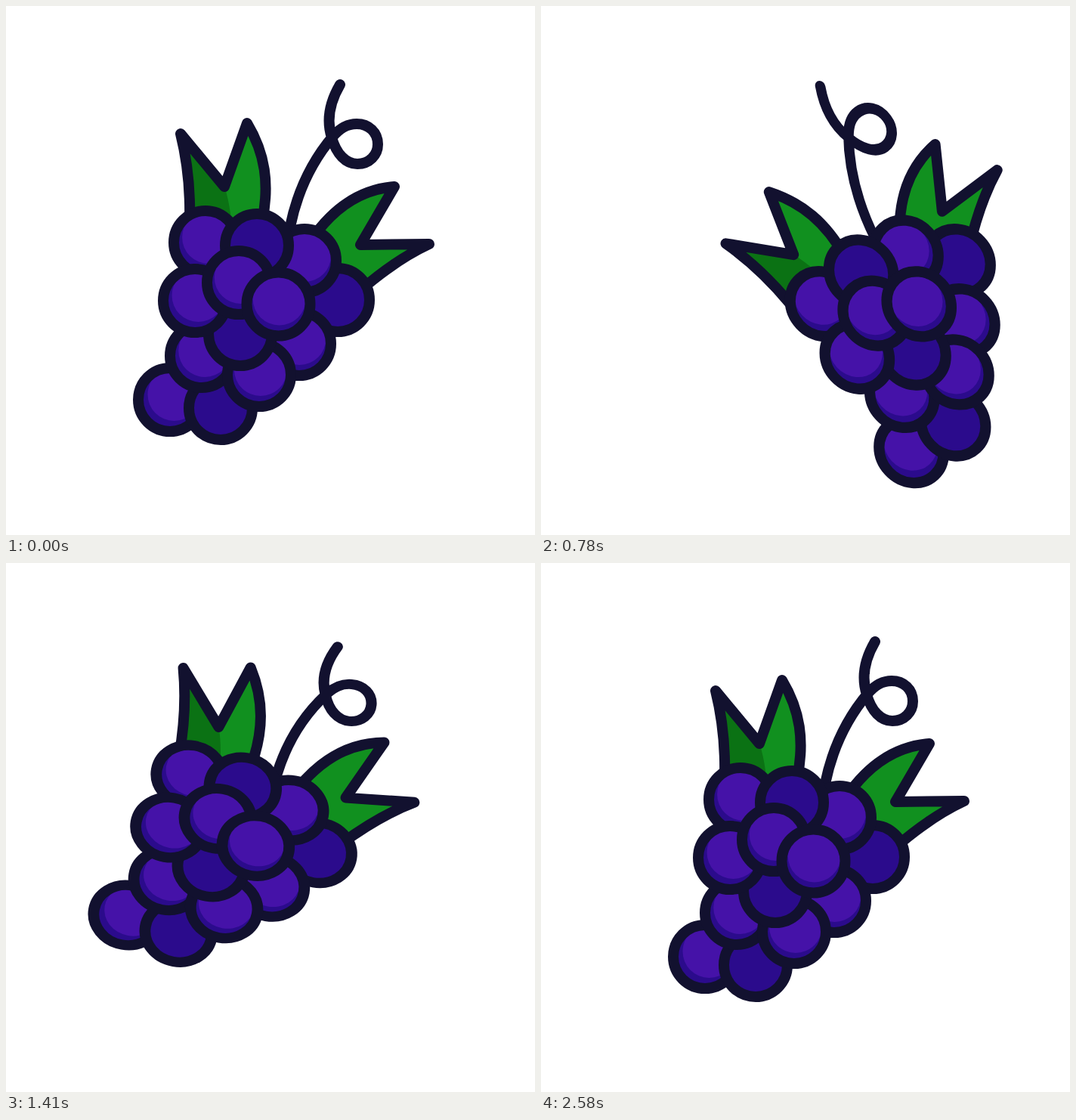
These frames come from a looping animation (700 by 700 pixels, 4.82 s). An HTML page:

```html
<!DOCTYPE html>
<html lang="en">
<head>
<meta charset="utf-8">
<title>Swinging grapes</title>
<style>
  html, body { margin: 0; width: 100%; height: 100%; overflow: hidden; background: #fff; }
  svg { display: block; width: 100%; height: 100%; }
  .line { fill: none; stroke: #12112f; stroke-width: 14; stroke-linecap: round; stroke-linejoin: round; }
  .leaf { fill: #11901f; }
  .fold { fill: #0b7214; }
  .grape { fill: #2b0b8c; }
  .shine { fill: #4512a8; }
</style>
</head>
<body>
<svg viewBox="0 0 700 700">
  <g id="tendril">
    <path class="line" d="M442 104C428 128 424 152 431 174C437 196 450 209 465 209C481 209 492 197 492 183C492 167 480 156 464 156C450 156 441 163 433 172C405 205 386 243 376 292L372 316"/>
  </g>
  <g id="left">
    <path class="leaf" d="M243 285C244 245 240 205 231 169L289 239L319 155C343 195 349 235 339 285L300 300Z"/>
    <path class="fold" d="M243 285C244 245 240 205 231 169L289 239Q296 258 300 300Z"/>
    <path class="line" d="M243 285C244 245 240 205 231 169L289 239L319 155C343 195 349 235 339 285"/>
  </g>
  <g id="right">
    <path class="leaf" d="M405 308C430 272 465 243 514 239L469 316L560 315C532 328 505 345 468 377Z"/>
    <path class="line" d="M405 308C430 272 465 243 514 239L469 316L560 315C532 328 505 345 468 377"/>
  </g>
  <g id="grapes"></g>
</svg>
<script>
const LOOP = 4820, STEP = 30;
const HUB = [431, 197];

// Turning points of each swing: [ms, value]
const SWING = {
  body: [[0, 0], [670, -39.2], [1335, 4.8], [1800, 0]],
  left: [[0, 0], [670, -43.5], [1450, 9], [1830, -.65], [2200, 0]],
  grapes: [[0, 0], [670, -46], [1390, 10], [1830, -2.75], [2200, .9], [2580, 0]],
  stretch: [[0, 0], [780, .068], [1410, -.055], [1830, .028], [2200, -.007], [2580, 0]],
  reach: [[0, 0], [600, .115], [1410, -.075], [1830, 0]],
  drift: [[600, 0], [1410, -10], [1830, 0]],
  lift: [[0, 0], [990, 1.5], [1410, -8], [1830, 0]],
  droop: [[0, 0], [900, 9.5], [1410, -2.5], [1830, .9], [2200, 0]]
};

// Back to front; the dark ones have no shine
const DARK = [[439, 389], [284, 532], [310, 434], [332, 317]];
const ORDER = [
  DARK[0], [388, 447], [217, 521], DARK[1], [259, 463], [335, 488], DARK[2],
  [395, 337], [264, 313], DARK[3], [250, 390], [308, 366], [360.5, 394.5]
];

const $ = id => document.getElementById(id);
const circle = (x, y, r, cls) => `<circle cx="${x}" cy="${y}" r="${r}" class="${cls}"/>`;

$('grapes').innerHTML = ORDER.map(p => {
  const [x, y] = p;
  const shine = DARK.includes(p) ? '' : circle(x + (400 - x) * .03, y - 7, 35, 'shine');
  return circle(x, y, 42, 'grape') + shine + circle(x, y, 42, 'line');
}).join('');

// Half a cosine wave between neighbouring turning points
function swing(name, t) {
  const keys = SWING[name];
  const i = keys.findIndex(k => k[0] > t);
  if (i === 0) return keys[0][1];
  if (i < 0) return keys.at(-1)[1];
  const [t0, a] = keys[i - 1], [t1, b] = keys[i];
  return a + (b - a) * (1 - Math.cos(Math.PI * (t - t0) / (t1 - t0))) / 2;
}

function draw(t) {
  const turn = swing('body', t), rad = turn * Math.PI / 180;
  const c = Math.cos(rad), s = Math.sin(rad);
  const bx = HUB[0] + swing('drift', t), by = HUB[1] + swing('lift', t);

  // The pivot rides on the body; the part turns and scales about it
  function place(id, [px, py], rot, dx = 0, dy = 0, sx = 1, sy = 1) {
    const x = px - HUB[0], y = py - HUB[1];
    $(id).setAttribute('transform',
      `translate(${bx + x * c - y * s + dx} ${by + x * s + y * c + dy}) ` +
      `rotate(${rot}) scale(${sx} ${sy}) translate(${-px} ${-py})`);
  }

  const k = swing('stretch', t), droop = swing('droop', t);
  place('right', HUB, turn);
  place('tendril', [378, 285], turn, 0, 0, 1 + turn * .0022, 1 + swing('reach', t));
  place('left', [300, 300], swing('left', t), -.3 * droop, droop);
  place('grapes', [400, 300], swing('grapes', t), -90 * k, -80 * k, 1 - .78 * k + 5 * k * k, 1 + k);
}

const start = performance.now();
function tick() {
  const t = (performance.now() - start) % LOOP;
  draw(Math.floor(t / STEP) * STEP);
  requestAnimationFrame(tick);
}
tick();
</script>
</body>
</html>
```
